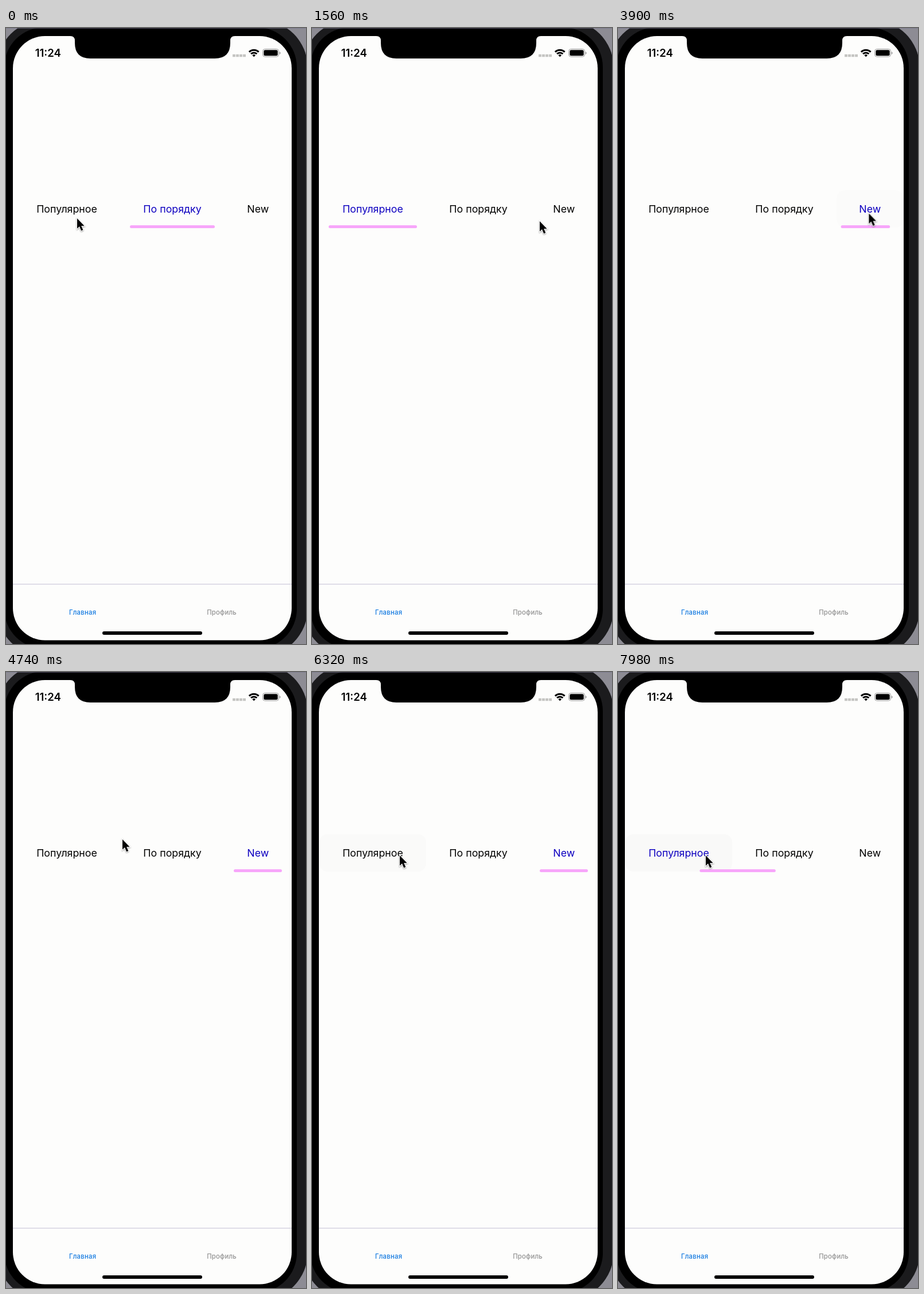
An HTML page for the animation above (8 s loop, 523 by 1071 pixels).

```html
<!DOCTYPE html>
<html lang="ru">
<head>
<meta charset="utf-8">
<title>Tabs</title>
<style>
  html, body { margin: 0; width: 100%; height: 100%; overflow: hidden; background: #8d8c94; }
  svg { display: block; width: 523px; height: 1071px; }
  text { font-family: Inter, Roboto, "Noto Sans", sans-serif; text-anchor: middle; }

  .tab { font-size: 17.8px; fill: #000; animation: 8s step-end infinite; }
  .popular { animation-name: popular; }
  .order { animation-name: order; }
  .new { animation-name: new; }
  @keyframes popular {
    0%, 39.25% { fill: #000; }
    1.5%, 92.75%, 100% { fill: #0e00c0; }
  }
  @keyframes order {
    0% { fill: #0e00c0; }
    1.5%, 100% { fill: #000; }
  }
  @keyframes new {
    0%, 92.75%, 100% { fill: #000; }
    39.25% { fill: #0e00c0; }
  }

  .bar {
    fill: #f7a6fa;
    animation: bar 8s cubic-bezier(.455, .03, .515, .955) infinite;
  }
  @keyframes bar {
    0%, 2.25% { x: 216px; width: 148px; }
    12.25%, 39.75% { x: 29px; width: 154px; }
    49.75% { x: 397px; width: 84px; }
    93.69% { x: 397px; width: 84px; animation-timing-function: cubic-bezier(.5, 0, .7, .616); }
    100% { x: 129px; width: 135px; }
  }

  .press { fill: #f9f9f8; opacity: 0; animation: 8s linear infinite; }
  .press-popular { animation-name: press-popular; }
  .press-new { animation-name: press-new; }
  @keyframes press-popular {
    0%, .25% { opacity: 0; }
    3%, 8% { opacity: 1; }
    12%, 77.25% { opacity: 0; }
    78.5% { opacity: .7; }
    82%, 100% { opacity: 1; }
  }
  @keyframes press-new {
    0%, 38.9% { opacity: 0; }
    41%, 46% { opacity: 1; }
    50%, 100% { opacity: 0; }
  }

  .cursor { animation: cursor 8s ease-in-out infinite; filter: drop-shadow(0 1px 1px #0006); }
  @keyframes cursor {
    0%, 10.5% { transform: translate(124px, 331px); }
    19.25%, 21% { transform: translate(397px, 336px); }
    30%, 47% { transform: translate(449px, 324px); }
    58.5%, 63% { transform: translate(203px, 291px); }
    74%, 100% { transform: translate(153px, 319px); }
  }
</style>
</head>
<body>
<svg viewBox="0 0 523 1071">
  <!-- phone body -->
  <rect x="-16" y="-14" width="542" height="1106" rx="83" fill="#1b1b1d"/>
  <rect x="-3" y="-1" width="510" height="1080" rx="69"/>
  <path d="M0 .5H523" stroke="#77748f" stroke-opacity=".6"/>
  <rect x="12" y="14" width="486" height="1050.5" rx="56" fill="#fdfdfc"/>
  <path d="M112 13V14Q120 14 120 22V26Q120 53 147 53H364Q391 53 391 26V22Q391 14 399 14V13Z"/>

  <!-- status bar -->
  <text x="73.3" y="50" font-size="18.6" font-weight="600">11:24</text>
  <path d="M395 48H418" stroke="#c5c5c2" stroke-width="4.5" stroke-dasharray="5 1"/>
  <g fill="none" stroke="#000" stroke-width="3">
    <path d="M423.8 41.6A12 12 0 0 1 440.6 41.6"/>
    <path d="M427 45A7.5 7.5 0 0 1 437.4 45"/>
  </g>
  <path d="M429.4 47.4A4 4 0 0 1 435 47.4L432.2 50.3Z"/>
  <rect x="447.5" y="36.5" width="28" height="13.5" rx="4" fill="none" stroke="#9b9b9b"/>
  <rect x="449.3" y="38.2" width="24.4" height="10.1" rx="2.5"/>
  <path d="M476.8 41V46Q478.6 45.2 478.6 43.5T476.8 41Z" fill="#9b9b9b"/>

  <!-- top tabs -->
  <rect class="press press-popular" x="13" y="282" width="186" height="65" rx="14"/>
  <rect class="press press-new" x="381" y="282" width="117" height="65" rx="14"/>
  <text class="tab popular" x="106" y="321">Популярное</text>
  <text class="tab order" x="290" y="321">По порядку</text>
  <text class="tab new" x="439.3" y="321">New</text>
  <rect class="bar" x="216" y="343" width="148" height="5" rx="2.5"/>

  <!-- bottom tabs -->
  <path d="M12 967H498" stroke="#d5d2e2" stroke-width="1.3"/>
  <g font-size="11.3" font-weight="500" letter-spacing=".25">
    <text x="133.6" y="1020" fill="#1279e0">Главная</text>
    <text x="376.1" y="1020" fill="#929292">Профиль</text>
  </g>
  <rect x="168" y="1049" width="174" height="6" rx="3"/>

  <path class="cursor" d="M0 0V17.8L4 14L7.2 21.4L10.3 20.1L7.2 12.9H12.6Z"
    stroke="#fff" stroke-width="2" paint-order="stroke"/>
</svg>
</body>
</html>
```
